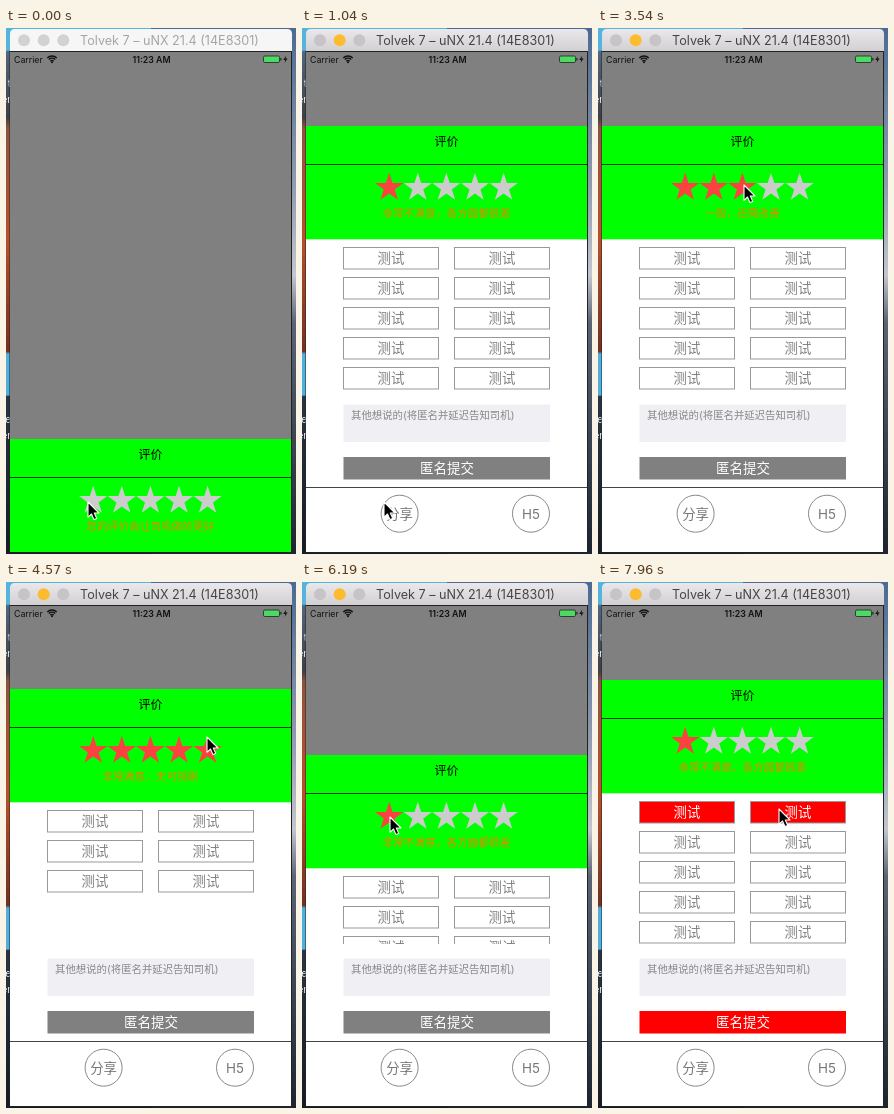
Animation of 290x526 px, one loop 8000 ms. Source, as an HTML page:

```html
<!DOCTYPE html>
<html lang="zh-CN">
<head>
<meta charset="utf-8">
<title>评价</title>
<style>
  html, body { margin: 0; width: 100%; height: 100%; overflow: hidden; background: #26303c; }
  svg { display: block; width: 290px; height: 526px; }
  text { font-family: Inter, "Noto Sans CJK SC", "Noto Sans CJK", sans-serif; }
</style>
</head>
<body>
<svg id="stage" viewBox="0 0 290 526">
  <defs>
    <linearGradient id="leftWall" x2="0" y2="1">
      <stop offset="0" stop-color="#55b4de"/><stop offset=".042" stop-color="#55b4de"/>
      <stop offset=".045" stop-color="#53667c"/><stop offset=".17" stop-color="#3c4049"/>
      <stop offset=".19" stop-color="#8d5440"/><stop offset=".4" stop-color="#b8512c"/>
      <stop offset=".615" stop-color="#74301f"/><stop offset=".62" stop-color="#4fb0de"/>
      <stop offset=".698" stop-color="#4fb0de"/><stop offset=".7" stop-color="#2a3544"/>
      <stop offset="1" stop-color="#141b25"/>
    </linearGradient>
    <linearGradient id="rightWall" x2="0" y2="1">
      <stop offset="0" stop-color="#4b6a92"/><stop offset=".3" stop-color="#8f9bb0"/>
      <stop offset=".47" stop-color="#c3c6cf"/><stop offset=".56" stop-color="#5b6475"/>
      <stop offset="1" stop-color="#1b2430"/>
    </linearGradient>
    <linearGradient id="activeBar" x2="0" y2="1">
      <stop offset="0" stop-color="#eae8ea"/><stop offset="1" stop-color="#d1cfd1"/>
    </linearGradient>
    <clipPath id="screenClip"><rect x="4" y="24" width="281" height="500"/></clipPath>
    <clipPath id="listClip"><rect id="listArea" x="4" y="0" width="281" height="0"/></clipPath>
  </defs>
</svg>
<script>
const $ = id => document.getElementById(id);
const stage = $('stage');

function add(parent, tag, attrs = {}, content = '') {
  const node = document.createElementNS('http://www.w3.org/2000/svg', tag);
  for (const key in attrs) node.setAttribute(key, attrs[key]);
  node.textContent = content;
  return parent.appendChild(node);
}
const set = (node, key, value) => node.setAttribute(key, value);
const shift = (node, x, y) => set(node, 'transform', `translate(${x} ${y})`);
const rect = (parent, x, y, width, height, fill, extra) =>
  add(parent, 'rect', { x, y, width, height, fill, ...extra });

// Text placed by the vertical middle of its glyphs
const label = (parent, content, x, middle, size, fill, extra) =>
  add(parent, 'text', { x, y: middle + size * .37, 'font-size': size, fill, 'text-anchor': 'middle', ...extra }, content);

function starPath(radius) {
  const points = Array.from({ length: 10 }, (_, i) => {
    const r = i % 2 ? radius * .382 : radius;
    const angle = i * Math.PI / 5;
    return `${(r * Math.sin(angle)).toFixed(2)} ${(-r * Math.cos(angle)).toFixed(2)}`;
  });
  return `M${points.join('L')}Z`;
}

// Desktop and window
rect(stage, 0, 0, 145, 526, 'url(#leftWall)');
rect(stage, 145, 0, 145, 526, 'url(#rightWall)');
for (const [word, y] of [['t', 55], ['er', 71], ['ne', 391], ['er', 407]])
  label(stage, word, 5, y, 10, '#eee', { 'text-anchor': 'end' });
const titleBar = add(stage, 'path', { d: 'M4 24V6Q4 1 9 1H281Q286 1 286 6V24Z' });
const lights = [18, 37.7, 57.3].map(cx => add(stage, 'circle', { cx, cy: 12.3, r: 6 }));
const title = label(stage, 'Tolvek 7 – uNX 21.4 (14E8301)', 163.5, 12.3, 12.6);
rect(stage, 3.5, 23, 282.5, 502, '#222');

// Phone screen
const screen = add(stage, 'g', { 'clip-path': 'url(#screenClip)' });
rect(screen, 4, 24, 281, 500, '#808080');
label(screen, 'Carrier', 8, 31.5, 8.8, '#111', { 'text-anchor': 'start' });
for (const r of [2.5, 4.8, 7])
  add(screen, 'path', {
    d: `M${46 - r * .68} ${35 - r * .73}A${r} ${r} 0 0 1 ${46 + r * .68} ${35 - r * .73}`,
    fill: 'none', stroke: '#111', 'stroke-width': 1.4
  });
add(screen, 'circle', { cx: 46, cy: 34.2, r: 1, fill: '#111' });
label(screen, '11:23 AM', 145.5, 31.5, 8.8, '#111', { 'font-weight': 600 });
rect(screen, 257.5, 28, 16, 6.5, '#4cd964', { rx: 1.3, stroke: '#222', 'stroke-width': .8 });
rect(screen, 274.3, 30, 1.2, 2.5, '#222');
add(screen, 'path', { d: 'M280.2 27.5L277.3 31.9H279.3L278.5 35L281.6 30.5H279.5Z', fill: '#111' });

// Sheet: white panel, tags, form, footer, green header
const panel = rect(screen, 4, 0, 281, 526, '#fff');
const listView = add(screen, 'g', { 'clip-path': 'url(#listClip)' });
const list = add(listView, 'g');
const tags = Array.from({ length: 10 }, (_, i) => {
  const x = i % 2 ? 152.5 : 41.5, y = 121.5 + 30 * (i >> 1);
  const group = add(list, 'g');
  const box = rect(group, x, y, 95, 21.5, '#fff', { stroke: '#999' });
  const text = label(group, '测试', x + 47.5, y + 11, 13.4, '#808080');
  return { group, box, text };
});

const form = add(screen, 'g');
rect(form, 41.5, 376.5, 206.5, 37.5, '#efeff4');
label(form, '其他想说的(将匿名并延迟告知司机)', 49, 387.5, 10.4, '#888', { 'text-anchor': 'start' });
const submit = rect(form, 41.5, 429, 206.5, 22.5, '#808080');
label(form, '匿名提交', 145, 440.3, 13.5, '#fff');

const header = add(screen, 'g');
rect(header, 4, 0, 281, 113.3, '#0f0');
label(header, '评价', 144.5, 15.3, 12, '#000', { 'font-weight': 500 });
rect(header, 4, 38, 281, 1, '#063806');
const stars = Array.from({ length: 5 }, (_, i) =>
  add(header, 'path', { d: starPath(14.9), transform: `translate(${87.2 + 28.6 * i} 61.7)` }));
const hint = label(header, '', 144.5, 87, 10.67, '#e88600');

const footer = add(screen, 'g');
rect(footer, 4, 459, 281, 1, '#444');
const [share, web] = ['分享', 'H5'].map(name => {
  const group = add(footer, 'g');
  add(group, 'circle', { cy: 485.7, r: 18.5, fill: 'none', stroke: '#888' });
  label(group, name, 0, 486, 13.4, '#777');
  return group;
});

const cursor = add(stage, 'path', {
  d: 'M0 0V15.3L3.5 12L6 17.6L8.7 16.4L6.3 11H11Z',
  fill: '#000', stroke: '#fff', 'stroke-width': 1.1, 'stroke-linejoin': 'round'
});

// Steps: [start in ms, value...]
const sheetSteps = [[0, 411], [590, 383], [740, 272], [890, 145], [1040, 98],
  [4570, 107], [4720, 139], [4860, 173], [5010, 188],
  [6190, 173], [6340, 138], [6490, 107], [6630, 98]];
const scoreSteps = [[0, 0], [440, 1], [2950, 2], [3540, 3], [3980, 4], [4570, 5], [6190, 1]];
const cursorSteps = [[0, 82, 474], [1490, 118, 424], [1630, 151, 371],
  [1930, 152, 335], [2070, 150, 255], [2220, 145, 180], [2360, 136, 129], [2510, 134, 146],
  [2660, 133, 155], [2800, 122, 157], [3100, 128, 157], [3250, 138, 157], [3400, 146, 157],
  [3830, 171, 156], [4120, 190, 156], [4270, 201, 155],
  [5160, 197, 162], [5300, 182, 180], [5450, 158, 202], [5600, 132, 221],
  [5750, 108, 232], [5900, 94, 235], [6040, 88, 235],
  [7520, 118, 232], [7670, 162, 229], [7810, 181, 227]];
const hints = ['您的评价会让司机做的更好', '非常不满意，各方面都很差', '不满意，比较差',
  '一般，还需改善', '比较满意，仍可改善', '非常满意，无可挑剔'];

const at = (steps, t) => steps.findLast(step => step[0] <= t).slice(1);

function render(t) {
  const [top] = at(sheetSteps, t);
  const [score] = at(scoreSteps, t);
  const active = t >= 440;
  const opening = t < 1040;

  set(titleBar, 'fill', active ? 'url(#activeBar)' : '#f6f6f6');
  set(title, 'fill', active ? '#454545' : '#a5a5a5');
  lights.forEach((light, i) => set(light, 'fill', active && i === 1 ? '#fdbc2f' : active ? '#c6c4c6' : '#d2d2d2'));

  set(panel, 'y', top + 113);
  shift(header, 0, top);
  shift(list, 0, top);
  set($('listArea'), 'y', top + 113);
  set($('listArea'), 'height', opening ? 151 : 249 - top);
  shift(form, 0, opening ? top - 98 : 0);

  stars.forEach((star, i) => set(star, 'fill', i < score ? '#fa4340' : '#ccc'));
  hint.textContent = hints[score];
  tags.forEach(({ group, box, text }, i) => {
    const picked = i === 0 && t >= 7070 || i === 1 && t >= 7960;
    set(group, 'visibility', score === 5 && i > 5 ? 'hidden' : 'visible');
    set(box, 'fill', picked ? '#f00' : '#fff');
    set(text, 'fill', picked ? '#fff' : '#808080');
  });
  set(submit, 'fill', t >= 7070 ? '#f00' : '#808080');

  // The footer settles while the sheet rises
  const left = opening ? (top - 98) / 313 : 0;
  set(footer, 'visibility', t < 590 ? 'hidden' : 'visible');
  shift(footer, 0, 4 * left);
  shift(share, 97.6, 0);
  shift(web, 229 - 56 * left, 0);

  shift(cursor, ...at(cursorSteps, t));
}

const start = performance.now();
function tick() {
  render((performance.now() - start) % 8000);
  requestAnimationFrame(tick);
}
tick();
</script>
</body>
</html>
```
